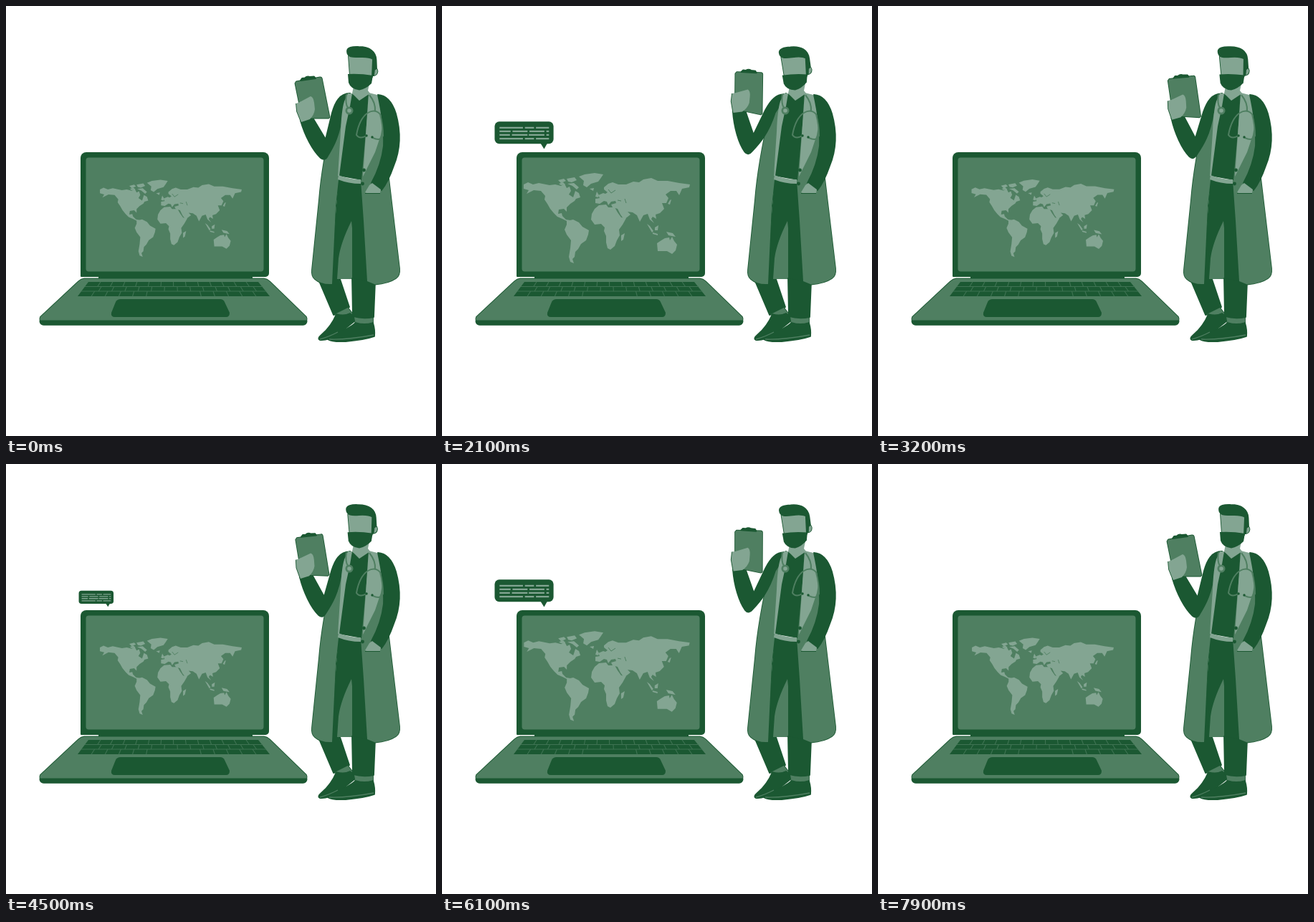
An HTML page with a canvas that plays this animation: 600 px wide and 600 px high, repeating every 8 s.

```html
<!DOCTYPE html>
<html lang="en">
<head>
<meta charset="utf-8">
<title>Online doctor</title>
<style>
html, body { margin: 0; width: 100%; height: 100%; overflow: hidden; background: #fff; }
canvas { display: block; width: 600px; height: 600px; }
</style>
</head>
<body>
<canvas id="stage"></canvas>
<script>
const LOOP = 8000, STEP = 100;
const DARK = '#1b5832', MID = '#4f7f61', LIGHT = '#83a592', SEAM = '#3f7353';

const canvas = document.getElementById('stage');
const ctx = canvas.getContext('2d');
const dpr = window.devicePixelRatio || 1;
canvas.width = canvas.height = 600 * dpr;
ctx.lineJoin = 'round';

const fill = (color, d) => {
  ctx.fillStyle = color;
  ctx.fill(new Path2D(d));
};
const line = (color, width, d) => {
  ctx.strokeStyle = color;
  ctx.lineWidth = width;
  ctx.stroke(new Path2D(d));
};
// A shape with a thin dark rim outside its edge
const rimmed = (color, d) => {
  line(DARK, 1.8, d);
  fill(color, d);
};
const box = (color, x, y, w, h, r) => {
  ctx.fillStyle = color;
  ctx.beginPath();
  ctx.roundRect(x, y, w, h, r);
  ctx.fill();
};
const dot = (color, x, y, r) => {
  ctx.fillStyle = color;
  ctx.beginPath();
  ctx.arc(x, y, r, 0, 7);
  ctx.fill();
};

// Draw with a rotation and scale around a pivot
const around = (x, y, angle, scale, draw) => {
  ctx.save();
  ctx.translate(x, y);
  ctx.rotate(angle);
  ctx.scale(scale, scale);
  ctx.translate(-x, -y);
  draw();
  ctx.restore();
};

const ease = (t, a, b) => {
  const x = Math.min(1, Math.max(0, (t - a) / (b - a)));
  return x * x * (3 - 2 * x);
};
// Rise from a to b, fall from c to d
const pulse = (t, a, b, c, d) => ease(t, a, b) - ease(t, c, d);

const LAND = [
  // North America
  'M114 249L120 246L127 249L135 247L150 250L158 249L166 251L171 248L174 254L178 252L180 258L177 263L183 267L186 258L191 261L193 267L187 269L185 272L179 276L174 281L174 287L170 283L163 284L162 290L167 289L168 293L173 298L179 299L176 301L168 297L161 294L156 289L151 283L147 276L143 270L144 265L138 258L128 257L118 262L121 257L114 255Z',
  // Arctic islands
  'M162 243L170 241L173 244L166 247ZM174 241L185 239L188 243L181 246L176 245ZM175 248L184 247L191 253L188 256L182 251ZM163 248L169 246L172 249L166 250Z',
  // Greenland
  'M191 238L199 235L213 233L225 235L221 241L218 245L208 248L202 253L197 250L198 244Z',
  // South America
  'M174 300L183 298L191 302L196 308L205 313L204 319L201 327L194 332L190 339L186 343L185 350L182 353L184 359L179 357L177 350L179 338L180 327L174 319L171 312L174 305Z',
  // Africa
  'M213 283L219 278L229 277L232 281L241 281L245 288L250 295L257 296L252 305L247 312L248 320L244 327L241 335L235 340L231 338L229 330L229 321L226 314L227 309L222 304L213 305L208 298L209 290ZM250 320L255 317L253 326L250 328Z',
  // Europe and Asia
  'M214 275L214 269L220 268L218 264L225 261L228 262L231 260L226 256L226 253L232 248L238 246L246 249L257 249L267 245L275 246L281 242L292 240L301 244L315 244L331 247L346 249L345 253L335 255L331 264L327 258L319 258L312 263L316 268L313 275L307 275L310 283L304 289L298 291L299 297L294 294L292 297L296 303L290 298L287 290L281 292L276 301L272 292L266 288L259 287L263 291L254 298L249 291L245 283L238 281L236 277L243 275L242 272L236 273L232 278L230 273L226 272L220 276Z',
  // Britain, Iceland, Japan
  'M214 266L216 259L219 264L218 267ZM206 255L212 254L211 258ZM315 276L318 271L320 270L318 277Z',
  // South-east Asia and Australia
  'M286 304L290 307L295 314L293 316ZM294 316L301 318L301 320L294 318ZM297 309L302 306L301 313L297 313ZM313 315L322 317L326 322L316 320Z',
  'M300 331L306 327L311 324L317 323L318 327L321 322L324 328L328 333L326 341L321 346L314 342L301 342Z'
].map(d => new Path2D(d));

function map(scale) {
  around(230, 297, 0, scale, () => {
    ctx.fillStyle = LIGHT;
    LAND.forEach(p => ctx.fill(p));
    line(MID, 1, 'M245 271L250 272M255 269L257 275M232 256L236 261L242 257');
  });
}

function keyboard() {
  fill(DARK, 'M115 385H352L368 405H100Z');
  line(SEAM, 1.1, 'M110 391.5H358M105 398H363');
  const rows = [385, 391.5, 398, 405];
  for (let r = 0; r < 3; r++) {
    for (let i = 1; i < 14; i++) {
      if (r === 2 && i > 5 && i < 9) continue;
      const u = (i + (r === 1 ? 0.3 : 0)) / 14;
      const at = y => {
        const k = (y - 385) / 20;
        return 115 - 15 * k + u * (237 + 31 * k);
      };
      line(SEAM, 1.1, `M${at(rows[r])} ${rows[r]}L${at(rows[r + 1])} ${rows[r + 1]}`);
    }
  }
}

function laptop(mapScale) {
  box(DARK, 104, 204, 263, 174, [8, 8, 5, 1]);
  box(MID, 111.5, 211.5, 248, 159, 4);
  map(mapScale);
  fill(DARK, 'M129 377H344V381H129Z');
  rimmed(MID, 'M109 380.5H360Q364 381 368 384.5L419 434Q421 439 417 440H50Q46 439 48 434L101 384.5Q105 381 109 380.5Z');
  keyboard();
  fill(DARK, 'M160 409H299Q303 409 305 413L312 428Q312 434 307 434H152Q146 434 147 428L153 413Q155 409 160 409Z');
  box(DARK, 46.5, 438.5, 374, 7.3, [1, 1, 6, 6]);
}

function bubble(scale) {
  if (scale < 0.01) return;
  around(142, 199, 0, scale, () => {
    box(DARK, 66.5, 157.5, 90.5, 34, 7);
    fill(DARK, 'M136.5 190H148L142.5 199.5Z');
    line(LIGHT, 2.4, 'M74 167H110M113 167H127M130 167H150M74 172.5H91M94 172.5H117M120 172.5H143M146 172.5H150' +
      'M74 178H90M93 178H117M119 178H143M146 178H150M74 183.7H110M113 183.7H127M130 183.7H150');
  });
}

function legs() {
  rimmed(DARK, 'M437 384L465 378L479 420Q470 428 457 431Z');
  rimmed(MID, 'M459 430L477 421L484 430L472 438Z');
  rimmed(DARK, 'M461 430Q472 433 480 429Q489 434 486 440L462 459Q449 467 438 466Q434 464 440 459Q454 447 461 430Z');
  rimmed(MID, 'M486 434H512V445H488Z');
  rimmed(DARK, 'M488 442Q500 446 512 442Q515 452 514 461Q500 466 474 468Q455 469 449 465Q450 460 463 456Q479 450 488 442Z');
  line(MID, 1.3, 'M438 465Q452 461 463 455M451 465Q476 466 513 459');
}

function body() {
  fill(MID, 'M460 290H515V381H456Z');
  rimmed(DARK, 'M483 380L515 385L513 434Q498 437 484 433Z');
  fill(DARK, 'M464 240L499 246L504 290L515 385L483 380V310L482 300Q467 330 464 352L462 381H455L460 290Z');
  rimmed(MID, 'M480 122Q464 126 457 150Q441 220 437 270L427 368Q426 377 431 381Q440 389 455 388L460 280L467 215L482 123Z');
  rimmed(MID, 'M506 122L523 128Q532 180 534 240L549 366Q550 376 544 380Q534 387 515 388.5L504 384L499 300L495 243Z');
  fill(DARK, 'M483 122L493 130L507 122L496 243L463 237L470 175Z');
  fill(LIGHT, 'M464 236Q479 242 495 242V248Q478 248 463 242Z');
  fill(LIGHT, 'M506 121L518 124Q525 140 526 163L523 180L515 204L498 238Z');
  rimmed(DARK, 'M519 124Q536 125 544 150Q555 189 541 223Q533 246 524 257L510 247Q524 221 527 195Q528 165 519 124Z');
  fill(LIGHT, 'M501 260L507 250L511 247L523 256L522 261H503Z');
  line(DARK, 1, 'M501 261.5H522');
  dot(DARK, 499.5, 229, 2.4);
  dot(DARK, 497.5, 248, 2.4);
}

function scope() {
  line(MID, 2, 'M475 123Q473 136 477 142M507 124Q516 135 515 147M504 180Q494 187 489 180Q493 157 505 149Q515 143 522 151Q526 166 526 181Q523 189 512 184');
  dot(MID, 479, 146, 5.5);
  dot(LIGHT, 479, 146, 2.8);
  dot(DARK, 503, 181, 1.7);
  dot(DARK, 511, 183, 1.7);
}

function arm() {
  rimmed(DARK, 'M480 122C465 122 459 135 455 149L446 186L428 156L411 160C417 181 428 202 439 212Q445 217 449 209C457 196 466 180 469 150Z');
  rimmed(MID, 'M405 105.5L438 99.5Q440 99 440.7 101L451.5 155L450 156.5H426L412 150L403.5 108Z');
  rimmed(DARK, 'M411 104L413 101L417 100.5Q420 97.5 424 99L430 98.5L432 101Z');
  line(DARK, 1.8, 'M412 162L406 147L405 136');
  fill(LIGHT, 'M410 134L425 126Q429 127 430 135L431 144Q430 152 424 158L412 162L406 147L405 136Z');
}

function head() {
  rimmed(LIGHT, 'M478 70L512 72L511 99L480 98Z');
  rimmed(LIGHT, 'M512 88Q518 85 518.5 91Q518 97 512 97Z');
  rimmed(DARK, 'M476 63C476 58 483 56.5 492 57C508 57 516 64 516.5 75L517 87L514 89L513 97L511 97L512 74C503 68 490 73 481 70.5C477 69 476 67 476 63Z');
  fill(DARK, 'M477 95Q494 94 512 97L510 108Q502 116 493 117.5Q481 116 478 107Z');
}

function doctor(lift) {
  legs();
  body();
  around(471, 129, 0.213 * lift, 1, arm);
  fill(LIGHT, 'M477 122L483 122L480 140L474 168L465 237L463 237L467 175Q468 146 472 133Z');
  fill(LIGHT, 'M485 112L507 108L505 118L508 122L493 132L483 122Z');
  scope();
  around(494, 120, -0.095 * lift, 1, head);
}

function draw(t) {
  const lift = pulse(t, 0, 2000, 2000, 3800) + pulse(t, 4030, 5850, 5850, 7700);
  const grow = pulse(t, 0, 1800, 2430, 3290) + pulse(t, 4450, 6250, 6860, 7720);
  const talk = pulse(t, 80, 900, 1920, 2880) + pulse(t, 4060, 4900, 5920, 6880);
  ctx.setTransform(dpr, 0, 0, dpr, 0, 0);
  ctx.fillStyle = '#fff';
  ctx.fillRect(0, 0, 600, 600);
  laptop(0.853 + 0.147 * grow);
  bubble(talk);
  doctor(lift);
}

function tick() {
  const t = performance.now() % LOOP;
  draw(Math.floor(t / STEP) * STEP);
  requestAnimationFrame(tick);
}
tick();
</script>
</body>
</html>
```
